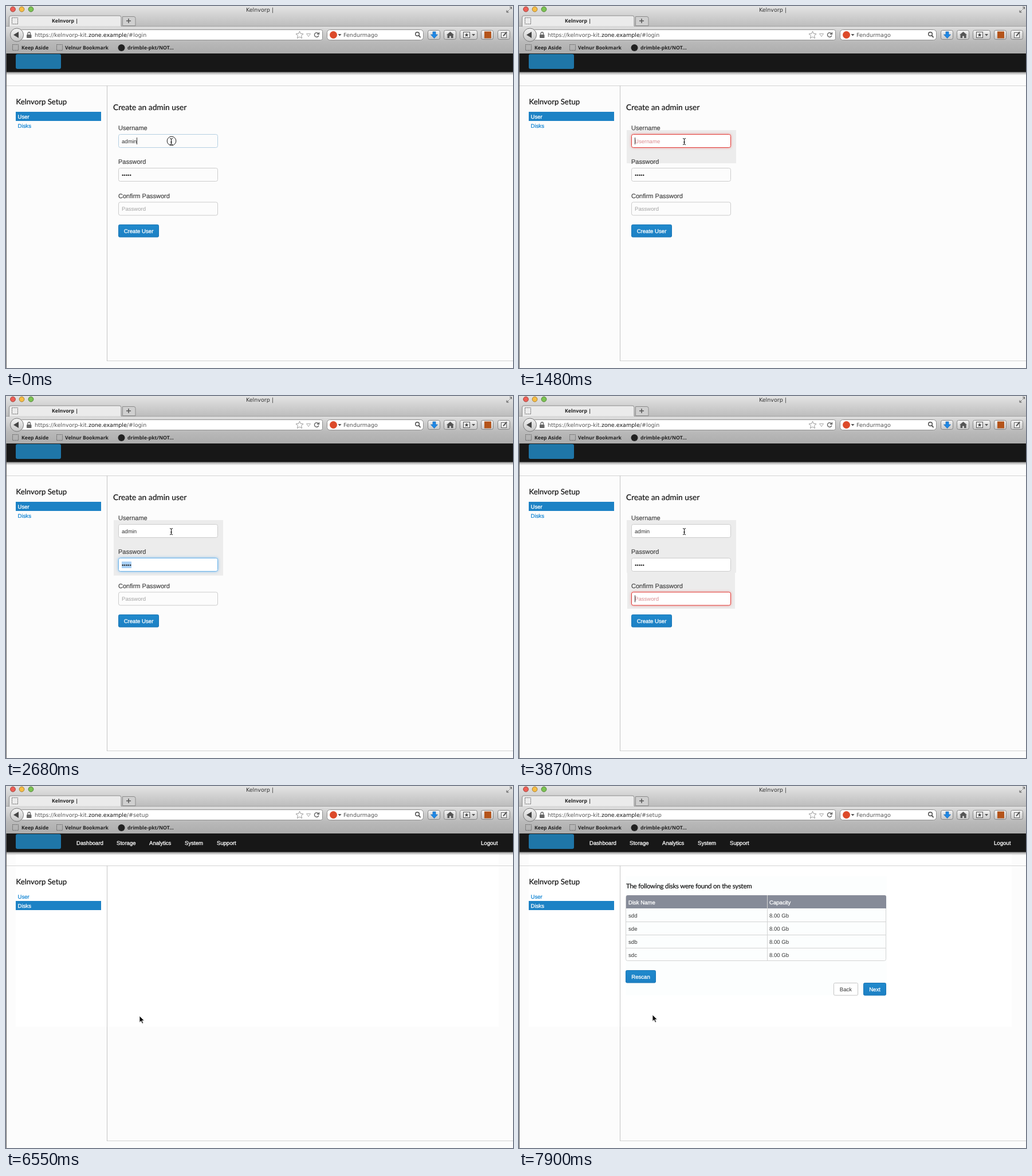
Write an HTML page that moves like this. It is 885x633 px and loops after 8000 ms.

```html
<!DOCTYPE html>
<html lang="en">
<head>
<meta charset="utf-8">
<title>Setup walkthrough</title>
<style>
  html, body { margin: 0; width: 100%; height: 100%; overflow: hidden; background: #fcfcfc; }
  svg { display: block; }
  text {
    font: 9.6px "Liberation Sans", Arial, sans-serif; fill: #333; white-space: pre;
    text-rendering: geometricPrecision; stroke-width: .2px;
  }
  .ui { font: 9.55px "DejaVu Sans", sans-serif; fill: #555; }
  .tab { font: bold 8.7px "Noto Sans", sans-serif; fill: #222; }
  .head { font: 13.8px Lato, sans-serif; fill: #111; stroke: #111; }
  .sub { font-size: 11.5px; letter-spacing: -.25px; }
  .label { font-size: 11px; fill: #444; stroke: #444; }
  .white { fill: #fff; stroke: #fff; stroke-width: .3px; }
  .link { fill: #0a80d2; stroke: #0a80d2; }
  .line { fill: none; stroke: #d3d3d3; }
  .dash { fill: none; stroke: #666; stroke-dasharray: 2 1; }
  .tool { fill: url(#btnGrey); stroke: #858585; }
  .box { fill: #fff; stroke: #ccc; }
  .box.idle { fill: #fcfcfc; }
  .box.pale { stroke: #b4cfe2; }
  .box.blue { stroke: #6db5ec; filter: drop-shadow(0 0 2.5px rgba(82,168,236,.7)); }
  .box.rose { stroke: #ee8a86; }
  .box.red { stroke: #e23b36; filter: drop-shadow(0 0 2px rgba(235,80,75,.5)); }
  .hint { fill: #a2a2a2; }
  .hint.red, .hint.rose { fill: #d98a8e; }
</style>
</head>
<body>
<svg id="stage" width="885" height="633" viewBox="0 0 885 633">
  <defs>
    <linearGradient id="bar" x2="0" y2="1">
      <stop offset="0" stop-color="#e4e4e4"/><stop offset=".17" stop-color="#d4d4d4"/>
      <stop offset=".42" stop-color="#bdbdbd"/><stop offset=".43" stop-color="#dedede"/>
      <stop offset=".76" stop-color="#b9b9b9"/><stop offset="1" stop-color="#adadad"/>
    </linearGradient>
    <linearGradient id="btnGrey" x2="0" y2="1">
      <stop offset="0" stop-color="#f4f4f4"/><stop offset="1" stop-color="#c6c6c6"/>
    </linearGradient>
    <linearGradient id="btnBlue" x2="0" y2="1">
      <stop offset="0" stop-color="#2089cc"/><stop offset="1" stop-color="#1c80c4"/>
    </linearGradient>
    <linearGradient id="shade" x2="0" y2="1">
      <stop offset="0" stop-color="#8c8c8c"/><stop offset="1" stop-color="#8c8c8c" stop-opacity="0"/>
    </linearGradient>
  </defs>

  <!-- browser window -->
  <rect width="885" height="633" fill="#fcfcfc"/>
  <rect width="885" height="83" fill="url(#bar)"/>
  <g stroke-width=".9">
    <circle cx="12" cy="5.700" r="4.400" fill="#ee5f57" stroke="#963a34"/>
    <circle cx="27.500" cy="5.700" r="4.400" fill="#f6bd45" stroke="#a17624"/>
    <circle cx="43.500" cy="5.700" r="4.400" fill="#7cc353" stroke="#47792c"/>
  </g>
  <text class="ui" x="443" y="10" text-anchor="middle" style="fill:#333">Kelnvorp |</text>
  <path d="M874 11l3.500-3.500M874 7.500V11h3.500M879 6l3.500-3.500M879 2h3.500v3.500" fill="none" stroke="#555"/>

  <path d="M0 35.500H885" stroke="#a2a2a2"/>
  <path d="M5.500 36V20q0-3 3-3H198q3 0 3 3V36z" fill="#ebebeb" stroke="#8b8b8b"/>
  <path d="M6 36H201" stroke="#e4e4e4" stroke-width="1.500"/>
  <rect class="dash" x="10.500" y="20.500" width="10" height="11"/>
  <text class="tab" x="80" y="29">Kelnvorp |</text>
  <path d="M203.500 34.500V18.500H223q3 0 3 3V34.500z" fill="#cfcfcf" stroke="#8b8b8b"/>
  <path d="M210 26h8M214 22v8" stroke="#555" stroke-width="1.500"/>

  <rect x="24.500" y="41.500" width="528" height="18" rx="3" fill="#fff" stroke="#8f8f8f"/>
  <circle cx="19" cy="50.500" r="11.500" fill="url(#btnGrey)" stroke="#777"/>
  <path d="M13 50.500l9-5.500v11z" fill="#444"/>
  <rect x="36" y="50" width="8.500" height="6" rx="1" fill="#666"/>
  <path d="M38 50v-2a2.200 2.200 0 0 1 4.400 0v2" fill="none" stroke="#666" stroke-width="1.400"/>
  <text class="ui" x="50" y="54">https://kelnvorp-kit.<tspan fill="#111">zone.example</tspan><tspan id="hash">/#login</tspan></text>
  <path d="M512.500 44l1.900 4.400 4.600.4-3.500 3.100 1.100 4.600-4.100-2.500-4.100 2.500 1.100-4.600-3.500-3.100 4.600-.4z" fill="#fff" stroke="#999"/>
  <path d="M524.500 48.500h7l-3.500 5z" fill="#fff" stroke="#aaa"/>
  <path d="M545.500 48.500a3.800 3.800 0 1 0 .4 3M546.500 46v3.300H543" fill="none" stroke="#666" stroke-width="1.400"/>
  <rect x="560.500" y="41.500" width="168" height="18" rx="5" fill="#fff" stroke="#8f8f8f"/>
  <circle cx="571.500" cy="50.500" r="6.500" fill="#dc4a2a"/>
  <path d="M579.500 49h6l-3 3.500z" fill="#555"/>
  <text class="ui" x="589" y="54">Fendurmago</text>
  <circle cx="718" cy="49" r="3.300" fill="none" stroke="#444" stroke-width="1.400"/>
  <path d="M720.500 51.500l3 3.500" stroke="#444" stroke-width="1.800"/>
  <g id="tools"></g>
  <path d="M745 45h5v5h3.500l-6 6.500-6-6.500h3.500z" fill="#1e88e5" stroke="#1565b5" stroke-width=".7"/>
  <path d="M769 50.500l6.500-5.500 6.500 5.500h-1.500v5.500h-3.500v-3.500h-3v3.500h-3.500v-5.500z" fill="#555"/>
  <rect x="798.500" y="45.500" width="11" height="10" fill="#eee" stroke="#555"/>
  <path d="M804 47l1 2.500h2.500l-2 1.600.8 2.600-2.300-1.500-2.300 1.500.8-2.600-2-1.600h2.500z" fill="#444"/>
  <path d="M813 49h6l-3 3.500z" fill="#555"/>
  <rect x="835" y="44.500" width="12" height="12" fill="#b4541a"/>
  <rect x="864.500" y="46.500" width="9" height="9" fill="#f4f4f4" stroke="#666"/>
  <path d="M868 52.500l6-7" stroke="#555" stroke-width="2"/>

  <rect class="dash" x="11.500" y="67.500" width="10" height="10"/>
  <text class="tab" x="27" y="76">Keep Aside</text>
  <rect class="dash" x="88.500" y="67.500" width="10" height="10"/>
  <text class="tab" x="103" y="76">Velnur Bookmark</text>
  <circle cx="201.500" cy="73" r="6" fill="#222"/>
  <text class="tab" x="212" y="76">drimble-pkt/NOT...</text>

  <!-- page frame -->
  <rect y="115" width="885" height="6" fill="url(#shade)"/>
  <rect y="83" width="885" height="32.500" fill="#171717"/>
  <rect x="17" y="84" width="79" height="26" rx="3" fill="#1f76a8"/>
  <g id="nav"></g>
  <rect id="fresh" x="17" y="120" width="843" height="301" fill="#fff"/>
  <path class="line" d="M0 139.500H885M885 620.500H176"/>
  <path d="M176.500 139V621" stroke="#c4c4c4"/>
  <path d="M.5 83V633" stroke="#666"/>

  <text class="head" x="17.500" y="172" style="font-size:13.200px">Kelnvorp Setup</text>
  <rect id="pick" x="17" width="149" height="16" fill="#1c82c5"/>
  <text id="sideUser" x="20.500" y="197">User</text>
  <text id="sideDisks" x="20.500" y="213">Disks</text>

  <g id="form">
    <g id="tint" fill="#ececec">
      <rect x="188" y="217" width="191"/>
      <rect x="189" y="309" width="188"/>
      <rect x="196" y="373" width="71" height="36"/>
    </g>
    <text class="head" x="187" y="182">Create an admin user</text>
    <g id="fields"></g>
    <g id="create"></g>
  </g>
  <g id="scan"></g>
  <g id="disks"></g>

  <!-- pointers -->
  <g id="ibeam">
    <path d="M-2.500 -5.500q2.500 0 2.500 2v7q0 2-2.500 2M2.500 -5.500q-2.500 0-2.500 2v7q0 2 2.500 2M-1.500 1h3" fill="none" stroke="#111"/>
  </g>
  <path id="arrow" d="M0 0v11.500l2.700-2.500 2 4.400 2-.9-2-4.200h3.700z" fill="#111" stroke="#fff" stroke-width=".8"/>
  <path id="hand" d="M-3.500 -6.500q1.500-1.200 2.500.5l1.200 3.500q1.300-1 2.200.2 1.300-.6 2 .6 1.500-.3 1.800 1.200l.3 3q-.3 1.500-1 2v1.500h-5.500q-.5-2-2.500-3.500l-2.500-2.500q.3-1.700 2-.8l1 .5z" fill="#fff" stroke="#111" stroke-width="1.100"/>
  <circle id="click" r="7.800" fill="none" stroke="#222"/>
</svg>

<script>
const LOOP = 8000;
const $ = id => document.getElementById(id);

function add(parent, tag, attrs, text) {
  const el = document.createElementNS('http://www.w3.org/2000/svg', tag);
  for (const k in attrs) el.setAttribute(k, attrs[k]);
  if (text) el.textContent = text;
  return parent.appendChild(el);
}
const label = (g, x, y, str, cls = '') => add(g, 'text', { x, y, class: cls }, str);
const show = (el, on) => { el.style.display = on ? '' : 'none'; };

// Value of the last [time, value] pair that has been reached
const at = (t, steps) => steps.reduce((v, [time, next]) => t >= time ? next : v, steps[0][1]);

function button(g, x, y, w, str, plain) {
  const face = add(g, 'rect', {
    x: x + .5, y: y + .5, width: w - 1, height: 21.5, rx: 2,
    fill: plain ? '#fff' : 'url(#btnBlue)', stroke: plain ? '#c4c4c4' : '#1a76b5'
  });
  const name = label(g, x + w / 2, y + 15, str, plain ? '' : 'white');
  name.setAttribute('text-anchor', 'middle');
  return { face, name };
}

function pager(g, rescanY, nextY) {
  button(g, 186, rescanY, 53, 'Rescan');
  button(g, 549, nextY, 43, 'Back', true);
  button(g, 601, nextY, 40, 'Next');
}

for (const [x, w] of [[737, 21], [765, 21], [793, 30], [830, 21], [859, 21]])
  add($('tools'), 'rect', { class: 'tool', x: x - .5, y: 42.5, width: w, height: 16, rx: 3 });

for (const [x, str] of [[123, 'Dashboard'], [193, 'Storage'], [250, 'Analytics'],
                        [312, 'System'], [368, 'Support'], [829, 'Logout']])
  label($('nav'), x, 103, str, 'white');

const create = button($('create'), 196, 382, 71, 'Create User');
pager($('scan'), 158, 182);

function buildDisks(g) {
  add(g, 'rect', { x: 186, y: 158, width: 456, height: 208, fill: '#fcfefe' });
  label(g, 187, 179, 'The following disks were found on the system', 'head sub');
  add(g, 'rect', { class: 'line', x: 186.5, y: 191.5, width: 454, height: 114, rx: 3 });
  add(g, 'path', { d: 'M187 214v-20q0-3 3-3H638q3 0 3 3v20z', fill: '#868b98' });
  add(g, 'path', { class: 'line', d: 'M433.500 191V306M187 237.500H641M187 260.500H641M187 283.500H641' });
  label(g, 191, 206.5, 'Disk Name', 'white');
  label(g, 437, 206.5, 'Capacity', 'white');
  ['sdd', 'sde', 'sdb', 'sdc'].forEach((name, i) => {
    label(g, 191, 229.5 + 23 * i, name);
    label(g, 437, 229.5 + 23 * i, '8.00 Gb');
  });
  pager(g, 322, 344);
}
buildDisks($('disks'));

function field(title, y, hint) {
  const g = $('fields');
  label(g, 196, y - 7, title, 'label');
  const box = add(g, 'rect', { x: 196.5, y: y + .5, width: 173, height: 23, rx: 3 });
  const sel = add(g, 'rect', { x: 202, y: y + 6.5, width: 17, height: 11.5, fill: '#a9d0f5' });
  const text = label(g, 202, y + 15.5, '');
  const caret = add(g, 'rect', { y: y + 6, width: 1, height: 12, fill: '#333' });
  return (value, focus, caretOn, selected) => {
    box.setAttribute('class', 'box ' + focus);
    text.textContent = value || hint;
    text.setAttribute('class', value ? '' : 'hint ' + focus);
    caret.setAttribute('x', value ? 202 + Math.round(text.getComputedTextLength()) : 202);
    show(caret, caretOn);
    show(sel, selected);
  };
}
const setUser = field('Username', 224, 'Username');
const setPass = field('Password', 283, 'Password');
const setConfirm = field('Confirm Password', 342.5, 'Password');

const dots = n => '•'.repeat(n);
const userLength = [[0, 5], [590, 4], [740, 3], [890, 2], [1040, 1], [1180, 0],
                    [1930, 1], [2080, 2], [2230, 3], [2380, 4], [2530, 5]];
const userFocus = [[0, 'idle pale'], [150, 'blue'], [1180, 'rose'], [1330, 'red'], [1930, 'blue'], [2680, '']];
const passFocus = [[0, 'idle'], [2680, 'blue'], [3870, '']];
const passLength = [[0, 5], [3270, 1], [3420, 3], [3570, 5]];
const confirmFocus = [[0, 'idle'], [3870, 'red'], [4310, 'blue'], [6100, 'pale'], [6250, '']];
const confirmLength = [[0, 0], [4310, 1], [4460, 3], [4610, 5]];
const travel = [[0, 0], [5060, .08], [5210, .42], [5360, .8], [5510, 1]];
const tints = [
  [[0, 0], [150, 36], [590, 58], [2680, 97], [3870, 92]],
  [[0, 0], [3870, 63], [4310, 65]],
  [[0, 0], [5510, 36]]
];

function drawForm(t) {
  setUser('admin'.slice(0, at(t, userLength)), at(t, userFocus), t < 2680, false);
  setPass(dots(at(t, passLength)), at(t, passFocus), t >= 3270 && t < 3870, t >= 2680 && t < 3270);
  setConfirm(dots(at(t, confirmLength)), at(t, confirmFocus), t >= 3870 && t < 5060, false);
  tints.forEach((steps, i) => $('tint').children[i].setAttribute('height', at(t, steps)));
  const hover = t >= 5510;
  create.face.setAttribute('fill', hover ? '#74c6fb' : 'url(#btnBlue)');
  create.name.style.fill = hover ? '#e6f4fd' : '';
}

function drawPointer(t) {
  const p = at(t, travel);
  const kind = t < 5060 ? 'ibeam' : t >= 5510 && t < 6550 ? 'hand' : 'arrow';
  let x = 288 - 53 * p, y = 237 + 173 * p;
  if (t >= 6550) { x = 233; y = t < 7900 ? 402 : 400; }
  for (const id of ['ibeam', 'arrow', 'hand']) show($(id), id === kind);
  $(kind).setAttribute('transform', `translate(${x + (kind === 'ibeam' ? .5 : 0)} ${y})`);
  $('click').setAttribute('transform', `translate(${x + 1} ${y - 1})`);
  show($('click'), t < 150 || (t >= 5950 && t < 6100));
}

function draw(t) {
  const setup = t >= 6550;
  show($('form'), !setup);
  show($('nav'), setup);
  show($('fresh'), setup);
  show($('scan'), t >= 6700 && t < 7300);
  show($('disks'), t >= 7300);
  $('hash').textContent = setup ? '/#setup' : '/#login';
  $('pick').setAttribute('y', setup ? 201 : 185);
  $('sideUser').setAttribute('class', setup ? 'link' : 'white');
  $('sideDisks').setAttribute('class', setup ? 'white' : 'link');
  if (!setup) drawForm(t);
  drawPointer(t);
}

const start = performance.now();
function tick() {
  draw((performance.now() - start) % LOOP);
  requestAnimationFrame(tick);
}
tick();
</script>
</body>
</html>
```
